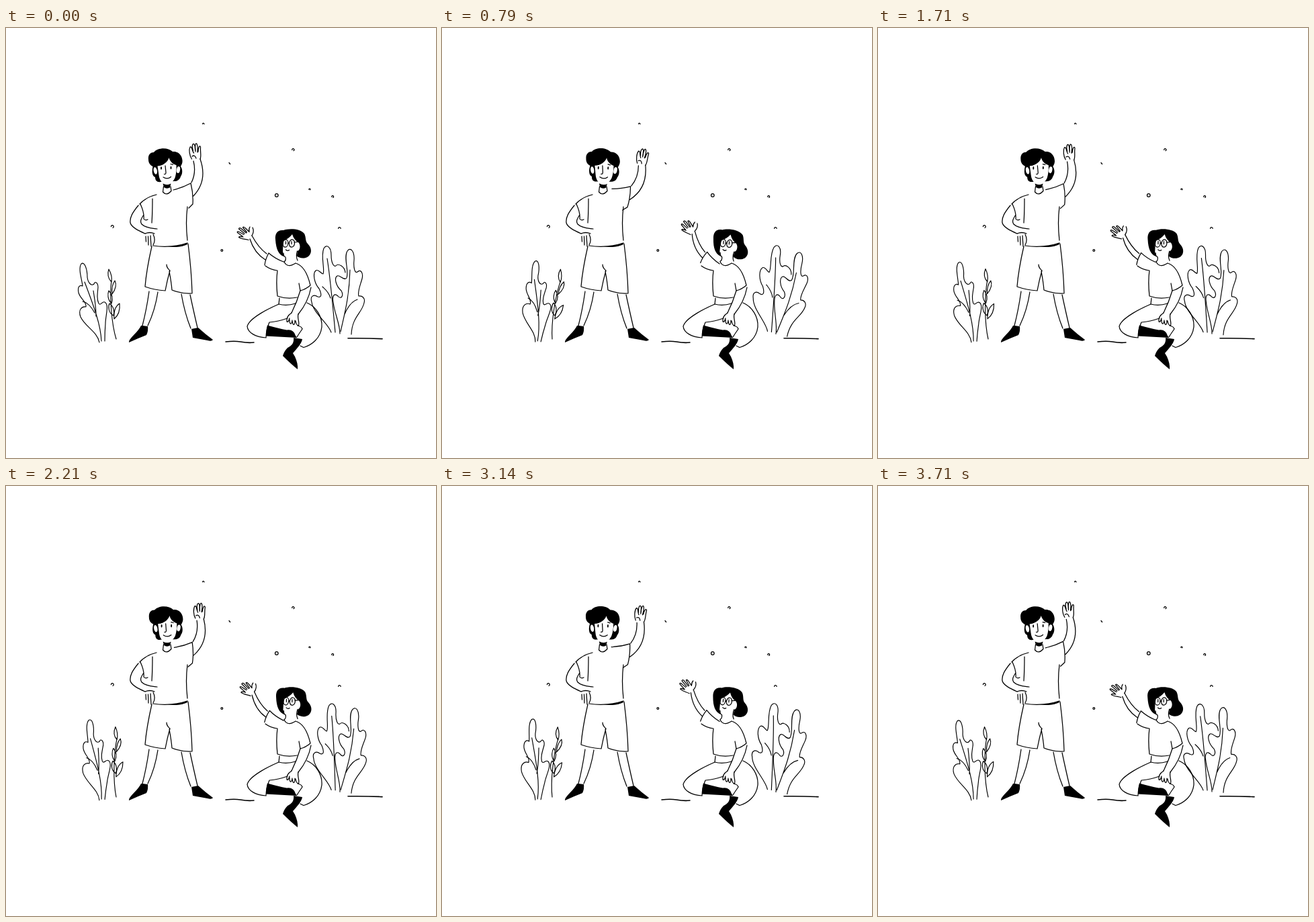
An HTML page that plays this animation: 640 by 640 pixels, repeating every 3.78 s.

```html
<!DOCTYPE html>
<html lang="en">
<head>
<meta charset="utf-8">
<title>Two friends waving</title>
<style>
  html, body { margin: 0; width: 100%; height: 100%; overflow: hidden; background: #fff; }
  svg { display: block; width: 100%; height: 100%; }
  .line { fill: none; stroke: #000; stroke-width: 1.25; stroke-linecap: round; stroke-linejoin: round; }
  .thin { stroke-width: 1.15; }
  .ink { fill: #000; stroke: none; }
  .skin { fill: #fff; stroke: none; }
</style>
</head>
<body>
<svg viewBox="0 0 640 640" class="line">
  <!-- floating specks and ground -->
  <g>
    <path d="M292.5 142.8a1.2 1.2 0 1 1 2.4 .2M425.8 181.5a1.6 1.6 0 1 1 2.2 1.2M332 200.5l1.6 2M451 240.6a1 1 0 1 1 1.7 .2M484.8 251.3a1.4 1.4 0 1 1 1.8 1M494.6 298.4a1.7 1.7 0 0 1 3.5 0M156.4 295.6a1.9 1.9 0 1 1 2.6 1.7"/>
    <circle cx="402.8" cy="249" r="2.3"/>
    <circle cx="321.3" cy="331" r="1.4"/>
    <path stroke-width="1.6" d="M327 467Q340 465.4 349 467Q360 469 369 468M509 461.8Q535 461.4 560 462.6"/>
  </g>

  <!-- left plants -->
  <g id="leaf" class="thin">
    <path d="M139 468C136 452 118 445 111 430C107 419 113 414 119 415C120 407 111 404 108 394C106 385 110 382 114 384C113 374 107 358 112 351C117 347 121 359 121 371C122 379 127 385 131 381C132 376 137 379 137 386C136 396 135 404 138 410C141 414 143 406 147 408C154 412 148 428 148 440C147 452 147 460 147 466"/>
    <path d="M142 466C141 440 129 410 117 378M132 424C126 413 119 408 114 407M134 429C134 412 131 399 130 391"/>
  </g>
  <g id="sprig" class="thin">
    <path d="M157 375C154 400 157 440 164 463M157 378C151 372 151 365 153 359C157 366 158 372 157 378M158 396C157 386 159 380 162 376C165 382 163 389 158 396M157 410C151 404 151 396 153 391C159 397 159 404 157 410M160 428C152 424 152 414 154 410C160 414 162 422 160 428M161 433C160 422 163 414 169 410C170 420 167 428 161 433"/>
  </g>

  <!-- right plant -->
  <g id="bush" class="thin">
    <path d="M484 453C480 440 457 424 455 408C452 399 458 396 464 400C470 402 470 396 466 388C459 380 456 366 461 361C465 358 469 366 472 366C475 360 468 340 473 328C477 321 484 326 484 338C484 350 488 356 491 354C494 350 504 354 505 364"/>
    <path d="M497 455C497 440 489 425 487 408C485 398 489 394 494 399C499 405 503 398 499 391C491 384 488 372 493 369C497 367 503 377 507 372C511 362 502 342 508 332C513 325 519 333 518 346C517 356 519 366 523 363C528 358 532 365 530 373C527 384 523 392 525 399C530 398 535 402 533 409C530 424 515 430 514 456"/>
    <path d="M490 453C487 420 483 374 478 343M498 452C504 425 511 400 512 360M483 402C480 392 474 388 471 385M504 426C510 412 517 406 523 404"/>
  </g>

  <!-- standing man -->
  <g>
    <path d="M224 248Q208 252 199 262M200 262Q206 275 205 284Q207 287 211 285M197 264C188 275 184 282 185 290C187 297 198 302 207 306M205 278C201 284 199 288 202 292C208 298 218 298 225 299"/>
    <path d="M208 310L208.500 318M211.500 310L212 323M215 309L216 325M219 307C221.500 312 222 318 219 323M207 306Q214 303 221 306"/>
    <path d="M218 254Q218 275 217 290M270 266Q267 290 270 316M219 324Q245 328 270 320"/>
    <path class="ink" d="M240 325Q258 325 270 319.500L270 322Q258 328 240 325Z"/>
    <path d="M217 325Q209 360 207 385Q221 390 237 391Q240 375 244 361Q239 357 239 352M243 362Q246 378 247 390Q262 396 277 395M271 321Q276 360 277 394"/>
    <path d="M213 392Q209 420 203 443M226 393Q222 420 211 443M261 396Q266 425 275 447M274 397Q280 425 285 446"/>
    <path class="ink" d="M203 443L211 444Q212 451 209 457Q196 462 183 468Q182 465 191 456Q198 449 201 443Z"/>
    <path class="ink" d="M276 448L286 446Q297 456 308 464Q306 467 300 465L278 461Z"/>
    <path d="M234.500 236L233.500 244Q239 250.500 246 242.500L245 236"/>
    <g id="manHead">
      <path class="ink" d="M212 196C211 189 215 185 220 185C225 178 241 177 248 184C256 183 262 189 262.500 197C263 201 261 204 260 206C263 210 263 217 260 221C259 225 256 228 251 228L230 229C225 230 222 227 222 222C217 220 217 213 218.500 206C214 204 212 200 212 196Z"/>
      <path class="skin" d="M225.500 205.500C234 205 241 199 242.500 193C244 199 249 203 253.500 204C254 212 253 218 251.500 223C248 230 244 232.500 239.500 232.500C233 232.500 228.500 227 227.500 219Z"/>
      <ellipse class="skin" cx="222.300" cy="212.500" rx="2.600" ry="5.300" transform="rotate(-12 222.300 212.500)"/>
      <ellipse class="skin" cx="256.500" cy="211" rx="2.600" ry="5" transform="rotate(10 256.500 211)"/>
      <path class="ink" d="M233.500 231.500Q240 235 245.500 231.500L244 237.500Q239 240 235 237Z"/>
      <path d="M237 205L238 215Q238 218 235.500 217.500M234 222Q240 226 245.500 221.500M229 204l3 -1M245 202.500l3.500 .8"/>
      <ellipse class="ink" cx="231" cy="208.500" rx="1" ry="2.300"/>
      <ellipse class="ink" cx="245.500" cy="208" rx="1" ry="2.300"/>
    </g>
    <g id="manArm">
      <path d="M249 241Q262 238 275 231Q279 247 278 262L272 268M289 195C295 212 296 232 279 250M279 198C282 210 280 222 276 230"/>
      <path d="M276.500 195C273 190 272 181 274 177C277 176 277 183 279.500 186M278.500 183C276 175 278 171 280 173C282 176 281 180 282 184M282 182C281 175 282 170 284 172.500C286 176 285 181 285 185M286 184C286 178 288 174 289.500 177C289 186 291 190 289 195M277 191Q281 188 283 194"/>
    </g>
  </g>

  <!-- seated woman -->
  <g>
    <path d="M414 348Q419 358 431 350C442 353 449 366 453 383Q446 389 438 391L436 380M386 354Q394 360 404 361C403 368 402 380 404 399Q418 404 433 401M407 402L406 411Q418 414 431 410"/>
    <path d="M454 386C451 402 444 415 435 426M438 391Q433 408 425 424"/>
    <path d="M425 424C419 428 417 432 418 437Q420 439 422 432M422 434C422 442 425 442 426 435M426 436C427 444 430 443 430 435M435 426C433 432 438 440 435 443Q432 442 431 436"/>
    <path d="M406 411C390 418 362 432 359 444C360 454 372 460 387 461Q387 450 392 438Q405 437 419 432M448 409C462 415 471 430 470 445C468 462 455 472 443 475.500L438 473M434 443Q440 444 441 448Q436 455 433 460"/>
    <path class="ink" d="M389 442.500Q405 447 418 449.500Q428 448 431 458L433 461L387 458.500Q387 449 389 442.500Z"/>
    <path class="ink" d="M428 461L441 463C440 470 432 478 427 484L430 489Q435 500 434 508Q424 500 412 488Q414 481 419 476C425 473 429 469 428 461Z"/>
    <g id="womanHead">
      <path class="ink" d="M401 315C400 306 404 300 413 301C420 298 438 298 444 306C447 312 445 317 449 321C456 328 455 336 450 340C444 344 437 343 432 339L413 340C406 337 402 330 401 315Z"/>
      <path class="skin" d="M412.500 317C418 315 423 311 426 307C428 313 431 317 435 319C438.500 322 438.500 330 434 332C433 340 431 345 430 348L415 348C416 344 413.500 340 412 333Z"/>
      <path d="M413 335Q413 340 416 341Q417 346 414 348M433.500 332Q431 340 434 346M416.500 330Q419 332.500 421.500 330.500M420 320.500q1 -1 1.500 0M429 319l5 -.5"/>
      <ellipse cx="416" cy="320.500" rx="3.800" ry="5.700" transform="rotate(8 416 320.500)"/>
      <ellipse cx="425.500" cy="320.500" rx="4" ry="5.700" transform="rotate(8 425.500 320.500)"/>
      <path d="M416.500 317.500v4M425 317.500v4"/>
    </g>
    <g id="womanArm">
      <path d="M413 348Q400 343 391 335Q386 344 385 353M366 309C373 322 381 331 388 336M363 314C368 330 378 340 386 345"/>
      <path d="M361 315.500C356 314 351 314.500 346.500 311.500Q347 309.500 353 311M352 310L344.500 304.500Q343.500 302 347 303.500L354 307.500M355 306L346.500 299Q347 296.500 350 298.500L357.500 305M358.500 304L352.500 297Q353.500 295 356.500 298L362 303.500Q361 299 363 296M366 309C369 304 368 299 367 297"/>
    </g>
  </g>
</svg>
<script>
  const LOOP = 3780, FRAMES = 53, CYCLE = 27, PEAK = 13;

  // id, pivot x, pivot y, degrees per step
  const parts = [
    ["manArm", 258, 256, 1.27],
    ["womanArm", 400, 350, 1.2],
    ["manHead", 239, 238, 0.3],
    ["womanHead", 422, 348, 0.45],
    ["bush", 494, 455, 0.86],
    ["leaf", 143, 467, 1.17],
    ["sprig", 164, 463, 1.17]
  ].map(([id, x, y, rate]) => ({ node: document.getElementById(id), x, y, rate }));

  // The left plants start their swing with a quick push.
  const push = step => step + (step && 1.6 * Math.max(0, 1 - (step - 1) / 5));

  function draw(now) {
    const frame = Math.floor(((now + 3) % LOOP) / LOOP * FRAMES);
    const step = PEAK - Math.abs(PEAK - Math.min(frame % CYCLE, 2 * PEAK));
    for (const { node, x, y, rate } of parts) {
      const swing = node.id === "leaf" || node.id === "sprig" ? push(step) : step;
      node.setAttribute("transform", `rotate(${swing * rate} ${x} ${y})`);
    }
  }

  const start = performance.now();
  function tick() {
    draw(performance.now() - start);
    requestAnimationFrame(tick);
  }
  tick();
</script>
</body>
</html>
```
